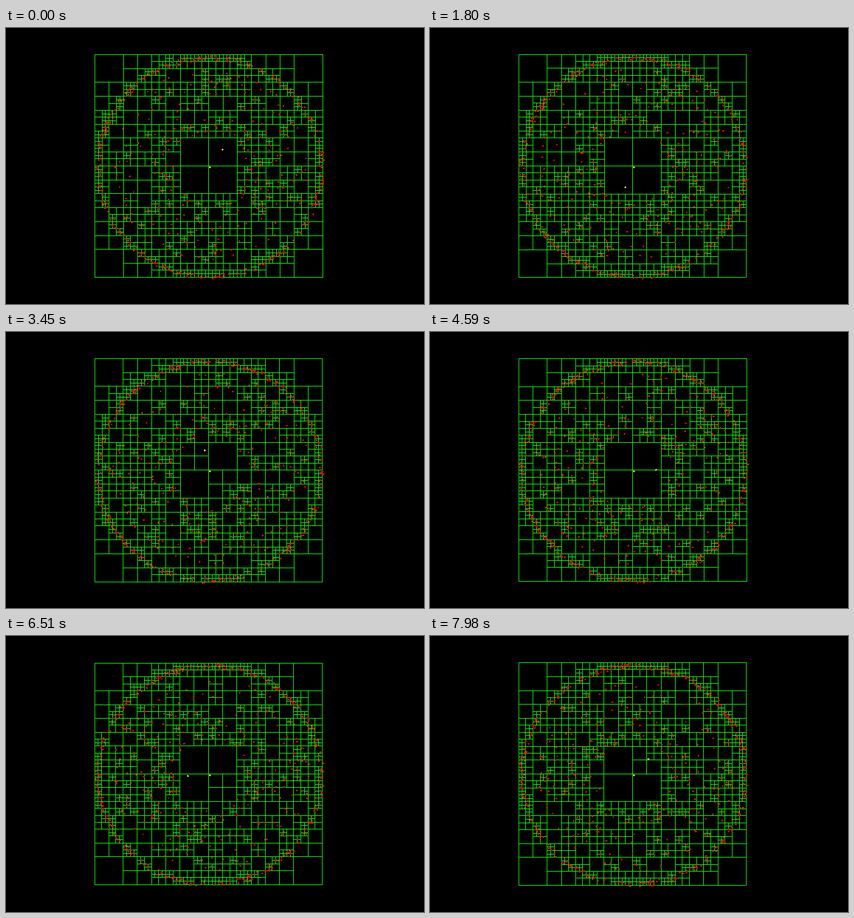
These frames come from a looping animation (684x451 px, 8000 ms). A matplotlib script:

```python
import numpy as np
import matplotlib.pyplot as plt
from matplotlib.animation import FuncAnimation

W, H, DPI = 684, 451, 64
FRAMES, INTERVAL = 250, 32
CX, CY = 331.8, 225.8          # the sun
RX, RY = 187.2, 182.8          # outer edge of the ring
BELT, RING = 335, 350          # number of bodies
MAX_DEPTH = 6
DOT = 1.35                     # dot radius in pixels
PLANET_R = 0.193
PLANET_SPEED = np.radians(91.1)

GREEN, RED, YELLOW = (0, 255, 0), (255, 0, 0), (255, 255, 0)

# planet's angle in degrees over time in ms
KEY_T = [0, 1800, 3450, 4590, 5670, 6510, 7980]
KEY_A = [-55.4, 113.6, 258.7, 357.0, 459.7, 540.0, 671.6]

rng = np.random.default_rng(12)
radius = np.concatenate([rng.uniform(0.32, 0.88, BELT),
                         rng.uniform(0.955, 1.0, RING)])
phase = rng.uniform(0, 2 * np.pi, BELT + RING)
speed = PLANET_SPEED * (PLANET_R / radius) ** 1.5


def place(r, a):
    return CX + RX * r * np.cos(a), CY + RY * r * np.sin(a)


def bodies(ms):
    """Positions of all bodies; the last two are the planet and the sun."""
    x, y = place(radius, phase + speed * ms / 1000)
    px, py = place(PLANET_R, np.radians(np.interp(ms, KEY_T, KEY_A)))
    return np.append(x, [px, CX]), np.append(y, [py, CY])


def hline(img, x0, x1, y):
    img[int(y), int(x0):int(x1) + 1] = GREEN


def vline(img, x, y0, y1):
    img[int(y0):int(y1) + 1, int(x)] = GREEN


def draw_tree(img, x, y):
    """Split every cell that holds more than one body."""
    left, top = x.min(), y.min()
    w, h = x.max() - left, y.max() - top
    for edge in (top, top + h):
        hline(img, left, left + w, edge)
    for edge in (left, left + w):
        vline(img, edge, top, top + h)
    for depth in range(MAX_DEPTH):
        n = 2 ** depth
        col = np.minimum((x - left) / w * n, n - 1).astype(int)
        row = np.minimum((y - top) / h * n, n - 1).astype(int)
        count = np.bincount(row * n + col, minlength=n * n)
        cw, ch = w / n, h / n
        for cell in np.flatnonzero(count > 1):
            x0 = left + cell % n * cw
            y0 = top + cell // n * ch
            hline(img, x0, x0 + cw, y0 + ch / 2)
            vline(img, x0 + cw / 2, y0, y0 + ch)


def draw_dots(img, x, y, color):
    x, y = x + 2, y + 2
    col, row = x.astype(int), y.astype(int)
    for dy in range(-2, 3):
        for dx in range(-2, 3):
            gap = np.hypot(col + dx + 0.5 - x, row + dy + 0.5 - y)
            inside = gap <= DOT
            img[row[inside] + dy, col[inside] + dx] = color


def render(frame):
    img = np.zeros((H, W, 3), np.uint8)
    x, y = bodies(frame * INTERVAL)
    draw_tree(img, x, y)
    draw_dots(img, x[:-2], y[:-2], RED)
    draw_dots(img, x[-2:], y[-2:], YELLOW)
    return img


fig = plt.figure(figsize=(W / DPI, H / DPI), dpi=DPI, facecolor="black")
ax = fig.add_axes([0, 0, 1, 1])
ax.axis("off")
view = ax.imshow(render(0), interpolation="nearest", aspect="auto")


def update(frame):
    view.set_data(render(frame))
    return [view]


anim = FuncAnimation(fig, update, frames=FRAMES, interval=INTERVAL,
                     repeat=True, repeat_delay=0, blit=False)
plt.show()
```
